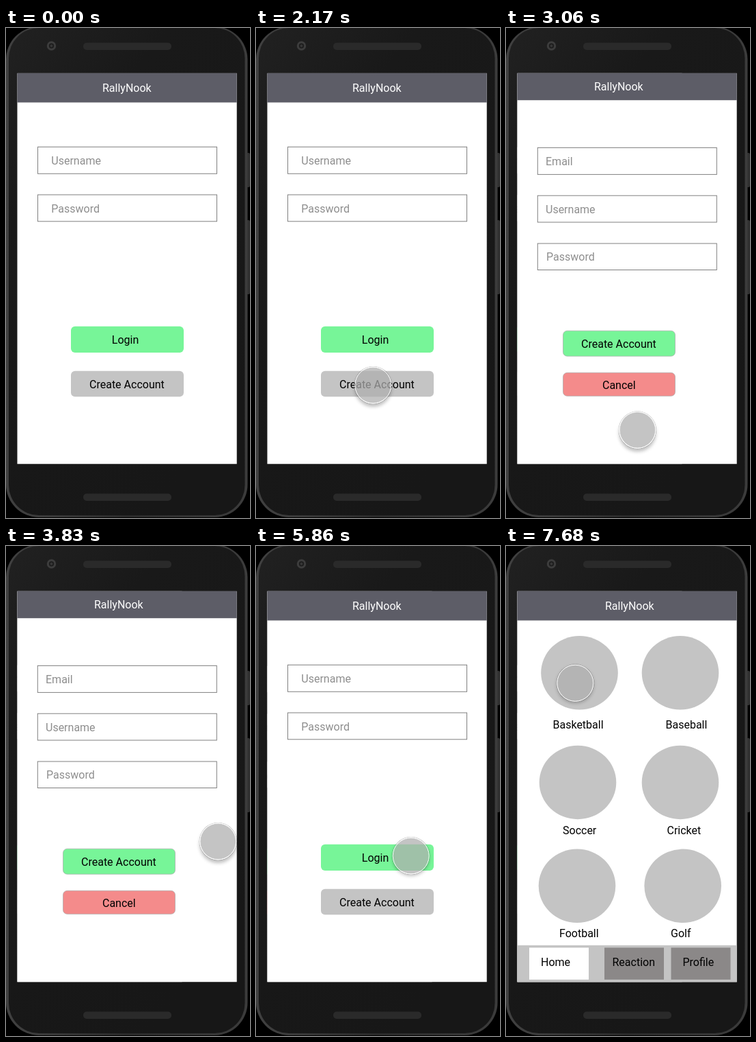
These frames come from a looping animation (357 by 714 pixels, 8000 ms). An HTML page:

```html
<!DOCTYPE html>
<html lang="en">
<head>
<meta charset="utf-8">
<title>Login prototype</title>
<style>
  html, body { margin: 0; width: 100%; height: 100%; overflow: hidden; background: #000; }
  svg { position: absolute; left: 0; top: 0; }
  text { font: 16px Roboto, Arial, sans-serif; }
  .bar { fill: #5d5d67; }
  .title { fill: #fff; }
  .field { fill: #fff; stroke: #808080; }
  .hint { fill: #8e8e8e; }
  .go { fill: #77f598; }
  .stop { fill: #f48b8b; }
  .grey { fill: #c4c4c4; }
  .tab { fill: #8b8888; }
  .edged { stroke: #aaa; stroke-opacity: .7; }
  #cursor {
    position: absolute; left: -27px; top: -27px; width: 54px; height: 54px;
    box-sizing: border-box; border: 1.3px solid #fff; border-radius: 50%;
    background: rgba(174, 174, 174, .73) padding-box;
  }
</style>
</head>
<body>
<svg width="357" height="714" viewBox="0 0 357 714">
  <defs>
    <linearGradient id="rim" x2="1" y2="0">
      <stop offset="0" stop-color="#414141"/><stop offset=".5" stop-color="#2a2a2a"/><stop offset="1" stop-color="#3c3c3c"/>
    </linearGradient>
    <linearGradient id="body" x2=".6" y2="1">
      <stop offset="0" stop-color="#212121"/><stop offset=".3" stop-color="#191919"/><stop offset="1" stop-color="#171717"/>
    </linearGradient>
    <clipPath id="clip"><rect x="16.5" y="65.7" width="321.2" height="569.8"/></clipPath>
  </defs>

  <g fill="#303030">
    <rect x="350" y="182" width="7" height="50" rx="2"/>
    <rect x="350" y="280" width="7" height="108" rx="2"/>
  </g>
  <rect y="-2" width="353.5" height="715" rx="48" fill="url(#rim)"/>
  <rect x="4" y="0" width="345.5" height="710" rx="44" fill="url(#body)"/>
  <g fill="#2a2a2a">
    <rect x="113" y="21.5" width="129" height="10.5" rx="5"/>
    <rect x="113" y="678.5" width="129" height="10.5" rx="5"/>
  </g>
  <circle cx="66.5" cy="26" r="5.2" fill="#1d1d1d" stroke="#3d3d3d" stroke-width="3"/>
  <circle cx="66.5" cy="26" r="2" fill="#363636"/>

  <g id="screen" clip-path="url(#clip)">
    <g id="login">
      <rect x="16" y="66" width="322" height="570" fill="#fff"/>
      <rect class="bar" x="16" y="66" width="322" height="43"/>
      <text class="title" x="141" y="93.5">RallyNook</text>
      <rect class="field" x="46.5" y="173.8" width="262" height="39"/>
      <text class="hint" x="66.3" y="199.5">Username</text>
      <rect class="field" x="46.5" y="243.5" width="262" height="38.8"/>
      <text class="hint" x="66.3" y="269">Password</text>
      <rect class="go" x="95" y="435.3" width="165" height="38.2" rx="6"/>
      <text x="154.8" y="460">Login</text>
      <rect class="grey" x="95" y="500.3" width="165" height="37.5" rx="6"/>
      <text x="122" y="525">Create Account</text>
    </g>
    <g id="signup">
      <rect x="16" y="66" width="322" height="570" fill="#fff"/>
      <rect class="bar" x="16" y="66" width="322" height="39.7"/>
      <text class="title" x="129" y="91.5">RallyNook</text>
      <rect class="field" x="46.3" y="174.9" width="262" height="39"/>
      <text class="hint" x="58" y="200.5">Email</text>
      <rect class="field" x="46.3" y="244.7" width="262" height="38.8"/>
      <text class="hint" x="58" y="270">Username</text>
      <rect class="field" x="46.3" y="314.5" width="262" height="38.5"/>
      <text class="hint" x="59" y="339.5">Password</text>
      <rect class="go edged" x="83.5" y="441.7" width="164" height="37" rx="6"/>
      <text x="110" y="466">Create Account</text>
      <rect class="stop edged" x="83.5" y="502.8" width="164" height="34" rx="6"/>
      <text x="141" y="526">Cancel</text>
    </g>
    <g id="home">
      <rect x="16" y="66" width="322" height="570" fill="#fff"/>
      <rect class="bar" x="16" y="66" width="322" height="43"/>
      <text class="title" x="145" y="93.5">RallyNook</text>
      <g class="grey">
        <ellipse cx="107.5" cy="185.3" rx="56.3" ry="53.7"/>
        <ellipse cx="255" cy="185.3" rx="56.3" ry="53.7"/>
        <ellipse cx="105" cy="345" rx="56.3" ry="53.7"/>
        <ellipse cx="255" cy="345" rx="56.3" ry="53.7"/>
        <ellipse cx="104" cy="495.8" rx="56.3" ry="53.7"/>
        <ellipse cx="258.7" cy="495.8" rx="56.3" ry="53.7"/>
        <rect x="16" y="582.3" width="322" height="54"/>
      </g>
      <text x="68.5" y="266.5">Basketball</text>
      <text x="233.5" y="266.5">Baseball</text>
      <text x="83" y="420">Soccer</text>
      <text x="235.5" y="420">Cricket</text>
      <text x="78" y="570.5">Football</text>
      <text x="241" y="570.5">Golf</text>
      <rect x="34" y="585.8" width="87" height="46.5" fill="#fff"/>
      <rect class="tab" x="144" y="585.8" width="87" height="46.5"/>
      <rect class="tab" x="241.5" y="585.8" width="87" height="46.5"/>
      <text x="51" y="612.5">Home</text>
      <text x="155.5" y="612.5">Reaction</text>
      <text x="258.5" y="612.5">Profile</text>
    </g>
    <rect id="dim" x="16" y="65" width="322" height="571"/>
  </g>
</svg>
<div id="cursor"></div>

<script>
const LOOP = 8000, SLIDE = 350, WIDTH = 322;
const $ = id => document.getElementById(id);
const stage = $('screen'), dim = $('dim'), cursor = $('cursor');
const pages = ['login', 'signup', 'home'].map($);
const [login, signup, home] = pages;

// start time, page leaving, page entering
const slides = [[2344.3, login, signup], [4764.3, signup, login], [6311, login, home]];

// time, x, y of the cursor centre
const path = [
  [930, 236, 760], [1000, 229, 715], [1140, 135, 640], [1210, 117, 595],
  [1350, 150.5, 503.5], [1500, 166, 510], [1700, 171.3, 518], [1830, 171.3, 518],
  [1900, 171.3, 520.5], [2860, 171.3, 520.5], [3000, 180, 570], [3150, 220, 599],
  [3400, 300, 560], [3560, 335, 500], [3690, 336, 446], [3760, 331, 437],
  [3830, 310.5, 430.5], [4000, 265, 442], [4320, 218.3, 455.5], [5460, 218.3, 455.5],
  [5620, 249, 459], [5860, 226.7, 451.5], [7220, 226.7, 451.5], [7350, 180, 475],
  [7480, 62, 395], [7550, 28, 300], [7680, 101.3, 199.8], [8000, 101.3, 199.8]
];

// press and release times
const taps = [[1830, 2100], [4270, 4530], [5800, 6080], [7620, 9000]];

const clamp = v => Math.min(1, Math.max(0, v));

// cubic-bezier(.4, 0, .2, 1), solved by bisection
function ease(x) {
  let lo = 0, hi = 1, s = .5;
  for (let i = 0; i < 20; i++) {
    s = (lo + hi) / 2;
    const bx = 1.2 * (1 - s) ** 2 * s + .6 * (1 - s) * s * s + s ** 3;
    if (bx < x) lo = s; else hi = s;
  }
  return x <= 0 ? 0 : x >= 1 ? 1 : s * s * (3 - 2 * s);
}

const slope = (i, k) => path[i] && path[i + 1]
  ? (path[i + 1][k] - path[i][k]) / (path[i + 1][0] - path[i][0]) : 0;

// turning points get a flat tangent, so the curve never overshoots
function tangent(i, k) {
  const a = slope(i - 1, k), b = slope(i, k);
  return a * b > 0 ? 2 * a * b / (a + b) : 0;
}

function along(t, k) {
  if (t <= path[0][0]) return path[0][k];
  const i = path.findIndex(p => p[0] > t) - 1;
  const [p, q] = [path[i], path[i + 1]];
  const d = q[0] - p[0], s = (t - p[0]) / d, r = 1 - s;
  return p[k] * (1 + 2 * s) * r * r + q[k] * s * s * (3 - 2 * s)
    + d * (tangent(i, k) * s * r * r - tangent(i + 1, k) * s * s * r);
}

const place = (page, x) => page.setAttribute('transform', `translate(${x} -.5)`);

function drawScreen(t) {
  const [start, from, to] = slides.filter(s => s[0] <= t).pop() || slides[0];
  const p = ease((t - start) / SLIDE);
  for (const page of pages) page.style.display = page === from || page === to ? '' : 'none';
  stage.append(from, dim, to);
  place(from, -WIDTH / 4 * p);
  place(to, WIDTH * (1 - p));
  dim.setAttribute('opacity', p / 2);
}

function drawCursor(t) {
  const press = Math.max(...taps.map(([down, up]) => clamp((t - down) / 70) - clamp((t - up) / 70)));
  const drop = 4.5 - 2.5 * press;
  cursor.style.transform = `translate(${along(t, 1)}px, ${along(t, 2)}px)`;
  cursor.style.boxShadow = `0 0 0 .5px rgba(0,0,0,.3), 0 ${drop}px 5px rgba(0,0,0,.25)`;
}

function frame(now) {
  const t = now % LOOP;
  drawScreen(t);
  drawCursor(t);
  requestAnimationFrame(frame);
}
frame(0);
</script>
</body>
</html>
```
